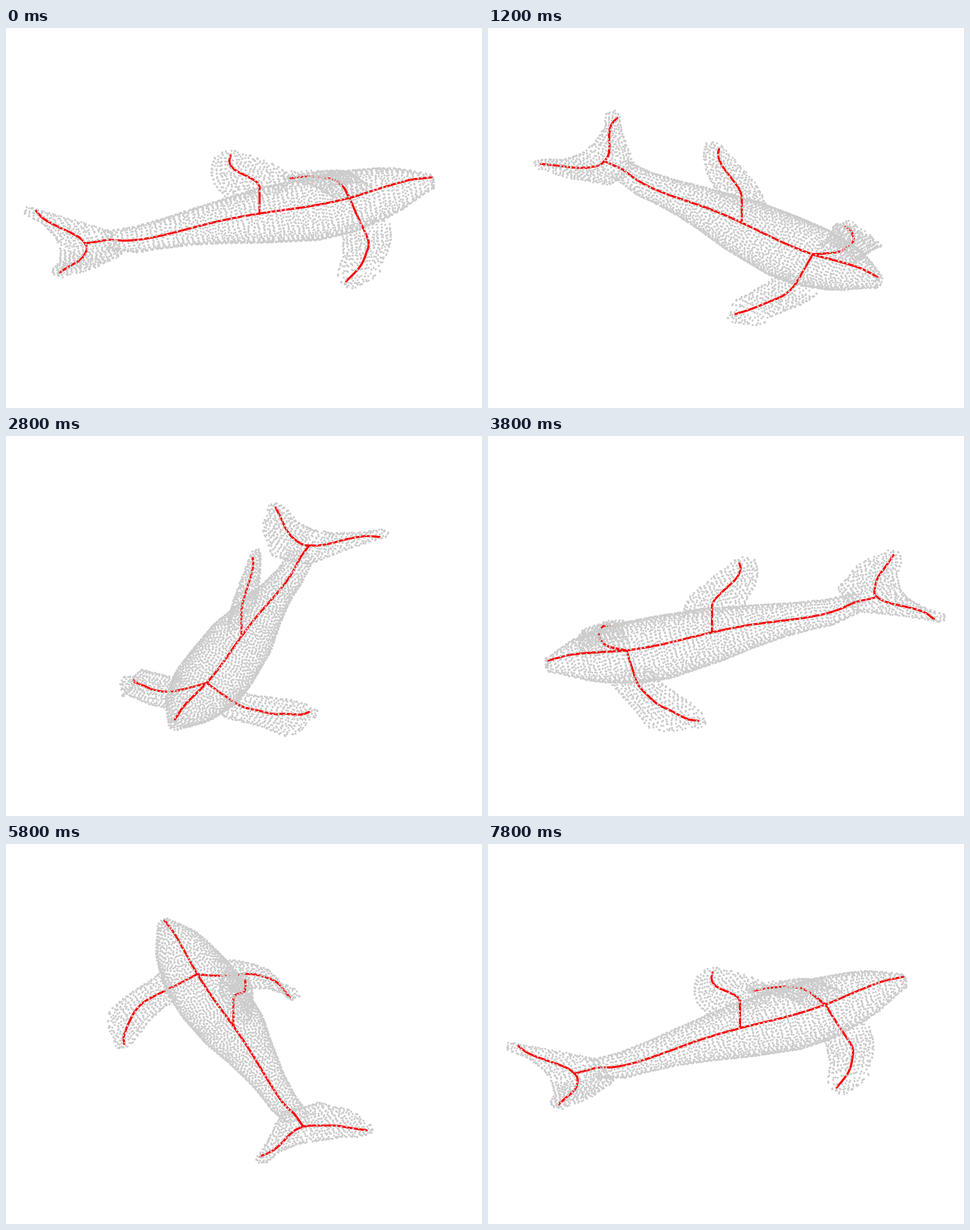
Write a matplotlib script that moves like this. It is 837 by 669 pixels and loops after 8 s.

```python
import numpy as np
import matplotlib.pyplot as plt
from matplotlib.animation import FuncAnimation

W, H, DPI = 837, 669, 100
FRAMES, INTERVAL = 40, 200
CX = W / 2
SIN_E, COS_E = 3 ** -0.5, (2 / 3) ** 0.5   # isometric camera elevation
YAW = np.radians(13.9)                     # heading of the body at the start
MID = 7.5                                  # lateral position of the body plane
GREY, RED = (0.8, 0.8, 0.8), (1.0, 0.0, 0.0)
rng = np.random.default_rng(4)

# Model coordinates: u along the body, w sideways, h projected height (down).


def curve(points, step=1.3):
    """Catmull-Rom curve through the points, evenly resampled."""
    p = np.array(points, float)
    p = np.vstack([2 * p[0] - p[1], p, 2 * p[-1] - p[-2]])
    t = np.linspace(0, 1, 40)[:, None]
    parts = []
    for a, b, c, d in zip(p, p[1:], p[2:], p[3:]):
        parts.append(0.5 * (2 * b + (c - a) * t
                            + (2 * a - 5 * b + 4 * c - d) * t ** 2
                            + (3 * b - a - 3 * c + d) * t ** 3))
    q = np.vstack(parts)
    s = np.r_[0, np.cumsum(np.linalg.norm(np.diff(q, axis=0), axis=1))]
    even = np.linspace(0, s[-1], int(s[-1] / step))
    return np.column_stack([np.interp(even, s, q[:, k]) for k in range(3)])


def in_plane(points):
    return [(u, MID, h) for u, h in points]


JOINT = (193, 7.7, 330)
PEC_NEAR = [JOINT, (197.5, -20, 341), (204, -57, 353.5), (204, -88, 357),
            (194, -112, 360), (176, -137, 368), (148, -150, 382.5)]
PEC_FAR = [JOINT, (197, 42, 342), (200, 76, 352), (193.5, 110, 357),
           (183, 131, 363), (169, 146, 367), (146, 167, 376), (127, 175, 380)]
FLUKES = [(-348, 116, 338.7), (-341.5, 92, 339), (-326.5, 69, 340),
          (-302.5, 41, 342), (-291, 24, 343), (-286, 8, 344),
          (-286, -6, 345), (-297, -28, 344), (-311, -46, 341),
          (-334, -65.5, 337.5), (-355, -84, 334)]
SPINE = in_plane([(342, 314.5), (307, 313.5), (281, 316), (240, 322.3),
                  (193, 330), (127, 334.6), (30, 335), (-38, 337.8),
                  (-100, 344.2), (-141, 348.5), (-182, 350.8),
                  (-213, 349), (-244, 343)])
DORSAL = in_plane([(30, 287.5), (24, 278), (8.5, 267), (-12, 254),
                   (-21.4, 244), (-24.5, 234.6), (-22.4, 225)])
STRAIGHT = [in_plane([(-244, 343), (-286, 344)]),
            in_plane([(30, 335), (30, 287.5)])]


def body():
    """Elliptic rings: position, centre height, half height, half width."""
    table = np.array([
        (-250, 344, 10, 24), (-223, 347, 13.5, 24), (-192, 350, 18, 25),
        (-161, 347, 19, 27), (-131, 345.5, 21, 29), (-100, 342.7, 22.5, 34),
        (-38, 340.5, 28, 44), (30, 339.5, 34, 58), (127, 340, 43, 62),
        (189, 336, 41, 62), (250, 330, 34, 51), (281, 326.5, 28, 42),
        (312, 323.5, 19, 27), (343, 322, 10, 12)])
    out = []
    t = np.linspace(0, 2 * np.pi, 200)
    for u in np.arange(-248, 344, 8.8):
        mid, hh, hw = (np.interp(u, table[:, 0], table[:, k]) for k in (1, 2, 3))
        arc = np.r_[0, np.cumsum(np.hypot(np.diff(hw * np.cos(t)),
                                          np.diff(hh / COS_E * np.sin(t))))]
        n = int(arc[-1] / 6.6)
        a = np.interp((np.arange(n) + rng.random()) / n * arc[-1], arc, t)
        out.append(np.column_stack([u + rng.normal(0, 1.1, n),
                                    MID + hw * np.cos(a),
                                    mid + hh * np.sin(a)]))
    cap = rng.uniform(-1, 1, (14, 2))
    out.append(np.column_stack([np.full(14, 344), MID + 8 * cap[:, 0],
                                322 + 9 * cap[:, 1]]))
    return np.vstack(out)


def blade(rows, lo, hi, thick, place):
    """Two-sided fin; lo and hi are (row, u) edges, place builds the points."""
    out = []
    lo, hi = np.array(lo, float), np.array(hi, float)
    for r, th in zip(rows, np.linspace(*thick, len(rows))):
        a, b = np.interp(r, *lo.T), np.interp(r, *hi.T)
        for side in (-1, 1):
            n = max(2, int(round(abs(b - a) / 8.2)) + 1)
            s = np.linspace(-1, 1, n)
            s = np.clip(s + rng.normal(0, 0.25 / n, n), -1, 1)
            u = (a + b) / 2 + (b - a) / 2 * s + rng.normal(0, 0.5, n)
            row = r + rng.normal(0, 0.9, n)
            out.append(place(u, row, side * th * np.sqrt(1 - s ** 2)))
    return np.vstack(out)


def flat_fin(bone):
    """Place points on a sheet whose height follows the given bone."""
    b = np.array(sorted((w, h) for _, w, h in bone))
    return lambda u, w, off: np.column_stack(
        [u, w, np.interp(w, b[:, 0], b[:, 1]) + off])


def upright(u, h, off):
    return np.column_stack([u, MID + off, h])


def cloud():
    near = blade(
        np.arange(-166, -46, 7.6),
        [(-166, 146), (-141, 134), (-115, 151), (-80, 160), (-50, 165)],
        [(-166, 170), (-142, 213), (-107, 236), (-85, 246), (-50, 252)],
        (4, 12), flat_fin(PEC_NEAR))
    far = blade(
        np.arange(188, 58, -7.6),
        [(60, 166), (79, 164), (115, 146), (145, 126), (167, 115), (188, 118)],
        [(60, 246), (75, 241), (116, 232), (164, 220), (183, 180), (188, 140)],
        (4, 12), flat_fin(PEC_FAR))
    lead = [(-95, -350), (-90, -314), (-80, -283), (-59, -256), (-44, -231),
            (28, -233), (44, -255), (76, -297), (110, -338), (127, -354)]
    trail = [(-95, -358), (-85, -367), (-65, -362), (-40, -343), (-15, -336),
             (1, -332), (35, -332), (80, -346), (112, -370), (127, -363)]
    sheet = flat_fin(FLUKES)
    tail = [blade(np.arange(-94, 12, 7.6), trail, lead, (4, 11), sheet),
            blade(np.arange(126, 12, -7.6), trail, lead, (4, 11), sheet)]
    dorsal = blade(
        np.arange(219, 296, 6.4),
        [(219, -38), (226, -53), (242, -57), (261, -56), (277, -48), (294, -33)],
        [(219, -14), (232, 14), (242, 34), (252, 55), (261, 70), (277, 81),
         (294, 86)],
        (4, 13), upright)
    return np.vstack([body(), near, far, dorsal] + tail)


bones = [curve(b) for b in [SPINE, DORSAL, FLUKES, PEC_NEAR, PEC_FAR] + STRAIGHT]
surface, lines = cloud(), np.vstack(bones)
model = np.vstack([surface, lines])
colors = np.array([GREY] * len(surface) + [RED] * len(lines))

# The small margin keeps the pixel size from being rounded down.
fig = plt.figure(figsize=((W + 0.01) / DPI, (H + 0.01) / DPI), dpi=DPI,
                 facecolor="white")
ax = fig.add_axes([0, 0, 1, 1])
ax.set_xlim(0, W)
ax.set_ylim(H, 0)
ax.axis("off")
dots = ax.scatter(model[:, 0], model[:, 1], s=(3.7 * 72 / DPI) ** 2,
                  c=colors, linewidths=0)


def update(i):
    a = 2 * np.pi * i / FRAMES - YAW
    u, w, h = model.T
    x = CX + u * np.cos(a) + w * np.sin(a)
    d = u * np.sin(a) - w * np.cos(a)
    order = np.argsort(COS_E * d - SIN_E / COS_E * h)   # far to near
    dots.set_offsets(np.column_stack([x, h + SIN_E * d])[order])
    dots.set_facecolors(colors[order])
    return (dots,)


anim = FuncAnimation(fig, update, frames=FRAMES, interval=INTERVAL,
                     repeat=True, repeat_delay=0, blit=False)
plt.show()
```
